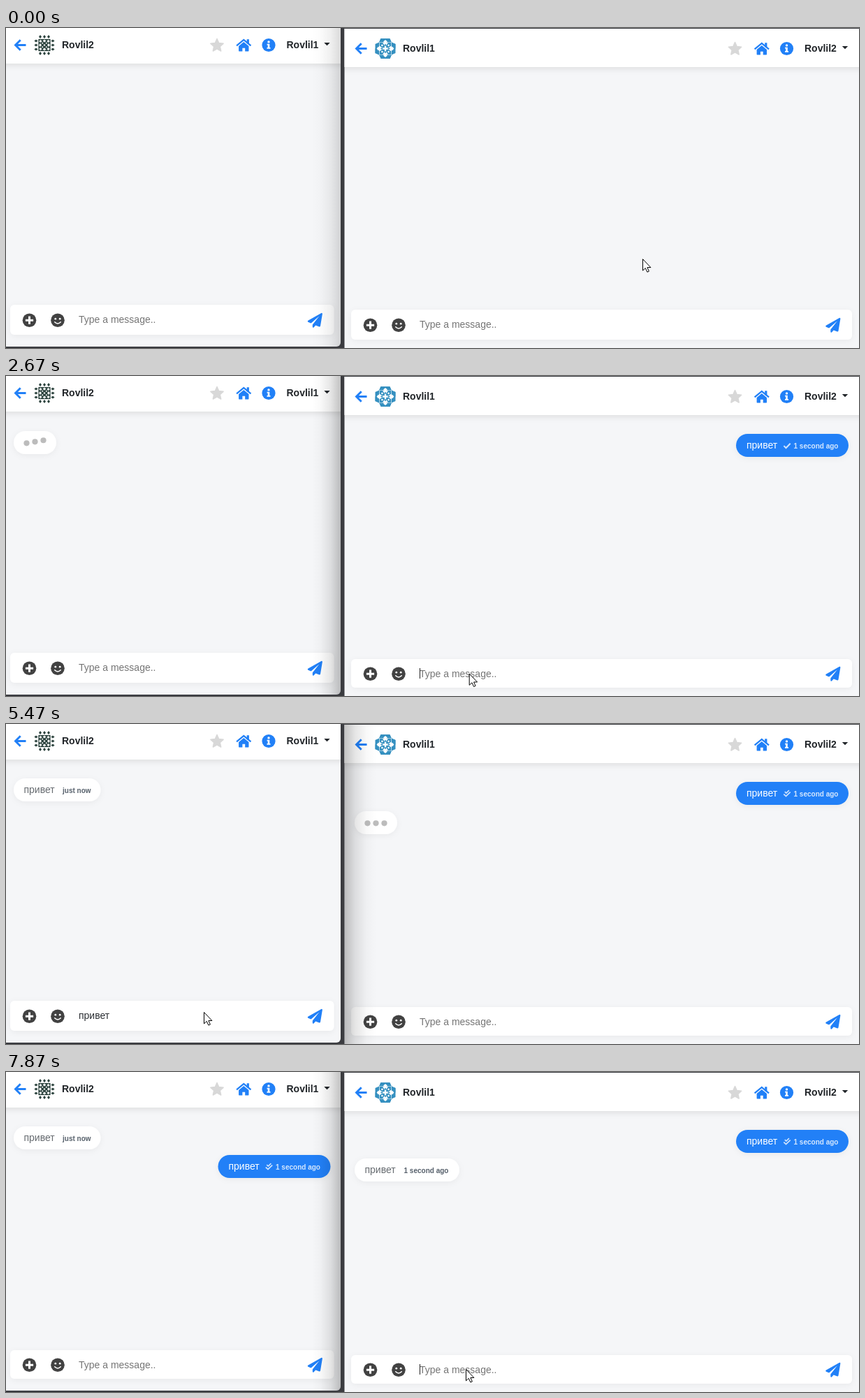
An HTML page that plays this animation: 1221x459 px, repeating every 8000 ms.

```html
<!DOCTYPE html>
<html lang="en">
<head>
<meta charset="utf-8">
<title>Two chat windows</title>
<style>
html, body { margin: 0; width: 100%; height: 100%; overflow: hidden; background: #3b3c40; }
svg { display: block; width: 100vw; height: 100vh; font: 14px "Liberation Sans", Arial, sans-serif; }
.bold { font-weight: 700; fill: #212529; }
.time { font-weight: 700; font-size: 10px; }
</style>
</head>
<body>
<svg id="stage" viewBox="0 0 1221 459" xmlns="http://www.w3.org/2000/svg"></svg>
<script>
const LOOP = 8000, BLINK = 530;
const BLUE = '#2180f7', DARK = '#424242', BG = '#f5f6f8';
const WORD = 'привет';
const stage = document.getElementById('stage');

const at = (x, y, body, extra = '') => `<g transform="translate(${x} ${y})" ${extra}>${body}</g>`;
const turns = (body) => [0, 90, 180, 270].map(a => `<g transform="rotate(${a})">${body}</g>`).join('');
const diamond = (x, y, rx, ry, fill) =>
  `<path d="M${x - rx} ${y}L${x} ${y - ry}L${x + rx} ${y}L${x} ${y + ry}Z" fill="${fill}"/>`;

// Icons are centred on 0,0
const arrow = `<path d="M.2-7.2L-7 0L.2 7.2M-6 0H8" fill="none" stroke="${BLUE}" stroke-width="2.9"/>`;
const home = `<g fill="${BLUE}"><path d="M4.4-8.3H7.6V-2H4.4Z"/>
  <path d="M0-4.6L7.2 1.5V8.3Q7.2 9 6.5 9H1.9V4.2H-1.9V9H-6.5Q-7.2 9-7.2 8.3V1.5Z"/>
  <path d="M-10.2.8L0-7.6L10.2.8" fill="none" stroke="${BLUE}" stroke-width="2.3"/></g>`;
const info = `<circle r="9.6" fill="${BLUE}"/><circle cy="-4.6" r="1.7" fill="#fff"/>
  <path d="M-2.4-1.8H1.3V3.4H2.5V5.3H-2.5V3.4H-1.3V0H-2.4Z" fill="#fff"/>`;
const plus = `<circle r="9.8" fill="${DARK}"/><path d="M-5.6 0H5.6M0-5.6V5.6" stroke="#fff" stroke-width="3"/>`;
const smile = `<circle r="9.8" fill="${DARK}"/><g fill="#fff"><circle cx="-3.2" cy="-2" r="1.4"/>
  <circle cx="3.2" cy="-2" r="1.4"/></g>
  <path d="M-4.3 2.6Q0 7 4.3 2.6" fill="none" stroke="#fff" stroke-width="1.5" stroke-linecap="round"/>`;
const plane = `<path d="M9.2-10.2L-9.8.6Q-11 1.6-9.6 2.6L-5.4 4.3L6.4-6L-3.2 6.4V9.6Q-3 11-1.5 10.3
  L1.2 7.2L6.4 9.3Q7.6 9.6 8 8.4L10.9-9.2Q10.7-10.8 9.2-10.2Z" fill="${BLUE}"/>`;
const star = (() => {
  let pts = '';
  for (let i = 0; i < 10; i++) {
    const r = i % 2 ? 4.5 : 9.6, a = i * Math.PI / 5;
    pts += `${(r * Math.sin(a)).toFixed(2)},${(-r * Math.cos(a)).toFixed(2)} `;
  }
  return `<polygon points="${pts}" fill="#d8d8d8" stroke="#d8d8d8" stroke-width="1.6" stroke-linejoin="round"/>`;
})();

const GREEN = '#2c433e', TEAL = '#3590c0';
const greenFace = `<circle r="15" fill="#fff"/><rect x="-8.6" y="-8.6" width="17.2" height="17.2" fill="${GREEN}"/>` +
  turns([-6, 0, 6].map(x => diamond(x, -12, 2, 2.6, GREEN)).join('') +
    diamond(-5.6, -5.6, 2.2, 2.2, '#fff') + diamond(0, -6, 2.4, 2, '#fff') +
    diamond(-2.8, -2.8, 1.3, 1.3, '#fff')) + diamond(0, 0, 1.5, 1.5, '#fff');
const tealFace = `<circle r="15" fill="#fff"/>` +
  turns(`<path d="M-6.5-14.5H6.5L9-9L14.5-6.5V0H0V-10L-9-9Z" fill="${TEAL}"/>`) +
  `<rect x="-9" y="-9" width="18" height="18" fill="#fff"/>` +
  turns(diamond(0, -10, 3, 2.4, '#fff') + diamond(-11.3, -11.3, 3.2, 3.2, '#fff') +
    `<path d="M-8.4-8.4H-4L-1.2-4.6V-1.2H-4.6L-8.4-4Z" fill="${TEAL}"/>` +
    diamond(-4.6, -4.6, 1.6, 1.6, '#fff') + diamond(0, -5, 1.3, 2, TEAL));

const tick = `<path d="M.9 5.6L4 8.7L10.2 2.2" stroke-width="2"/>`;
const ticks = `<path d="M.8 6.2L4 9.2L10.2 3.2" stroke-width="1.7"/><path d="M2.3 2.6L4.3 4.6L8.4.6" stroke-width="1.5"/>`;

const pill = (w, fill) => `<rect width="${w}" height="33" rx="16.5" fill="${fill}" filter="url(#soft)"/>`;

const received = (id, x, y) => at(x, y, `
  <g id="${id}Old">${pill(150, '#fff')}<text class="time" x="70.5" y="21" fill="#56606b">1 second ago</text></g>
  <g id="${id}New">${pill(124.5, '#fff')}<text class="time" x="70" y="21" fill="#56606b">just now</text></g>
  <text x="14.5" y="21" fill="#666b70">${WORD}</text>`, `id="${id}Got"`);

const sent = (id, x, y) => at(x, y, pill(161, BLUE) + `
  <text x="15" y="21" fill="#fff">${WORD}</text>
  <g fill="none" stroke="#cfe3fd">${at(67.5, 11.5, tick, `id="${id}One"`)}${at(67.5, 11.5, ticks, `id="${id}Two"`)}</g>
  <text class="time" x="82.5" y="21" fill="#d3e6fe">1 second ago</text>`, `id="${id}Sent"`);

const dots = (id, x, y) => at(x, y, pill(61, '#fff') +
  [0, 1, 2].map(i => `<circle id="${id}Dot${i}" cx="${18.5 + 12 * i}" r="4.1" fill="#bcbcbc"/>`).join(''), `id="${id}Dots"`);

// dx shifts left-aligned parts, dr right-aligned ones; hy and iy shift header and input bar
function chat({ id, dx, dr, hy, iy, face, peer, me }) {
  const right = dr + 480;
  return `
  <rect x="${dx - 4}" width="${right - dx + 4}" height="459" fill="${BG}"/>
  <rect x="${dx - 20}" y="-20" width="${right - dx + 40}" height="${71 + hy}" fill="#fff" filter="url(#bar)"/>
  ${at(dx, hy, at(20.5, 24.5, arrow) + at(55, 24.5, face) + `<text class="bold" x="80" y="28.5">${peer}</text>`)}
  ${at(dr, hy, at(302, 25.2, star) + at(340.3, 24.5, home) + at(376, 24.5, info) +
    `<text class="bold" x="401.5" y="28.5">${me}</text><path d="M455.3 21H463.7L459.5 25.3Z" fill="#212529"/>`)}
  <rect id="${id}Bar" x="${dx + 6}" width="${dr - dx + 463.5}" rx="6" fill="#fff" filter="url(#soft)"/>
  <g id="${id}Icons">${at(dx + 33.5, 0, plus) + at(dx + 74, 0, smile) + at(dr + 442, 0, plane)}</g>
  <text id="${id}Hint" x="${dx + 104}" fill="#757575">Type a message..</text>
  <text id="${id}Typed" x="${dx + 104}" fill="#2b2f33"></text>
  <rect id="${id}Caret" width="1" height="15" fill="#222"/>`;
}

const fade = (id, x1, x2) => `<linearGradient id="${id}" x1="${x1}" x2="${x2}">
  <stop offset="0" stop-color="#000" stop-opacity=".24"/><stop offset=".35" stop-color="#000" stop-opacity=".1"/>
  <stop offset=".7" stop-color="#000" stop-opacity=".025"/><stop offset="1" stop-color="#000" stop-opacity="0"/></linearGradient>`;

const L = { id: 'l', dx: 0, dr: 0, hy: 0, iy: 0, face: greenFace, peer: 'Rovlil2', me: 'Rovlil1',
  keys: [4270, 4330, 4400, 4600, 4730, 4870], send: 5730, focus: [[3400, 6800]],
  typing: [2300, 3270], wave: 2390, got: 3270, fresh: 4930, read: 7330 };
const R = { id: 'r', dx: 488, dr: 741.5, hy: 5, iy: 7, face: tealFace, peer: 'Rovlil1', me: 'Rovlil2',
  keys: [1600, 1670, 1730, 1800, 1930, 2070], send: 2270, focus: [[730, 3400], [6800, LOOP]],
  typing: [4940, 7070], wave: 5060, got: 7070, fresh: LOOP, read: 4000 };

stage.innerHTML = `
<defs>
  <filter id="soft" x="-20%" y="-50%" width="140%" height="200%"><feDropShadow dx="0" dy="2" stdDeviation="4" flood-opacity=".05"/></filter>
  <filter id="bar" x="-5%" y="-20%" width="110%" height="160%"><feDropShadow dx="0" dy="2" stdDeviation="5" flood-opacity=".11"/></filter>
  <clipPath id="lClip"><rect x="-10" y="-10" width="489" height="467" rx="6"/></clipPath>
  <clipPath id="rClip"><rect x="484.5" y="1" width="737" height="458"/></clipPath>
  ${fade('toLeft', 1, 0)}${fade('toRight', 0, 1)}
</defs>
<rect width="1221" height="459" fill="#3b3c40"/>
<g clip-path="url(#lClip)">${chat(L)}${received('l', 11, 78)}${dots('l', 11, 79)}${sent('l', 303.5, 119)}
  <rect id="lShade" x="438" width="41" height="459" fill="url(#toLeft)"/></g>
<g clip-path="url(#rClip)">${chat(R)}${sent('r', 1045, 83)}${received('r', 499, 124)}${dots('r', 499, 125)}
  <rect id="rShade" x="484" width="46" height="459" fill="url(#toRight)"/></g>
<g id="mouse" stroke="#000" fill="#fff">
  <path id="pointer" d="M0 0V16.4L3.8 12.9L6.4 18.6L8.9 17.5L6.4 12H11.4Z"/>
  <path id="resize" d="M-10 0L-5-5V-1.5H5V-5L10 0L5 5V1.5H-5V5Z"/>
</g>`;

const el = {};
stage.querySelectorAll('[id]').forEach(n => el[n.id] = n);
const show = (id, on) => el[id].setAttribute('visibility', on ? 'inherit' : 'hidden');
const set = (id, attrs) => { for (const k in attrs) el[id].setAttribute(k, attrs[k]); };
const within = (t, [a, b]) => t >= a && t < b;

// time, x, y of the pointer
const path = [[0, 911.5, 331.5], [70, 911.5, 331.5], [730, 712.5, 428], [869, 712.5, 428], [870, 712.5, 427.5],
  [2500, 712.5, 427.5], [3130, 440, 425], [3330, 265.5, 417.5], [3530, 281.5, 414.5], [4600, 281.5, 414.5],
  [4800, 283.5, 413.5], [6000, 283.5, 413.5], [6270, 490, 459], [6730, 658.5, 426.5], [LOOP, 658.5, 426.5]];

function pointerAt(t) {
  const i = Math.max(1, path.findIndex(p => p[0] > t));
  const [t0, x0, y0] = path[i - 1], [t1, x1, y1] = path[i];
  const u = (t - t0) / (t1 - t0), e = u * u * (3 - 2 * u);
  return [x0 + (x1 - x0) * e, y0 + (y1 - y0) * e];
}

// One bounce: up and down in 280 ms, each dot 65 ms after the one before
function lift(t, wave, i) {
  if (t < wave || t > 6900) return 0;
  const p = (t - wave) % 940 - 65 * i;
  return 4.4 * Math.max(0, 1 - Math.abs(p - 140) / 140);
}

function drawChat(w, t) {
  const { id, dx, iy } = w;
  const done = t >= w.send, drop = done ? 2 : 0;
  const typed = done ? '' : WORD.slice(0, w.keys.filter(k => t >= k).length);
  set(id + 'Bar', { y: 397 + iy + drop, height: 43 - drop });
  set(id + 'Icons', { transform: `translate(0 ${419.2 + iy + drop / 2})` });
  set(id + 'Hint', { y: 422.5 + iy + drop });
  set(id + 'Typed', { y: 422.5 + iy + drop });
  el[id + 'Typed'].textContent = typed;
  show(id + 'Hint', !typed);

  const span = w.focus.find(f => within(t, f));
  const last = span && Math.max(...[span[0], ...w.keys, w.send].filter(k => k <= t));
  show(id + 'Caret', span && (t - last) % (2 * BLINK) < BLINK);
  const end = typed ? el[id + 'Typed'].getComputedTextLength() : 0;
  set(id + 'Caret', { x: Math.floor(dx + 104 + end), y: 410 + iy + drop });

  show(id + 'Sent', done);
  show(id + 'One', done && t < w.read);
  show(id + 'Two', done && t >= w.read);
  const got = t >= w.got;
  show(id + 'Got', got);
  show(id + 'Old', got && t < w.fresh);
  show(id + 'New', got && t >= w.fresh);
  show(id + 'Dots', within(t, w.typing));
  for (let i = 0; i < 3; i++) set(`${id}Dot${i}`, { cy: 17.3 - lift(t, w.wave, i) });
}

function draw(t) {
  drawChat(L, t);
  drawChat(R, t);
  const leftActive = within(t, L.focus[0]);
  set('lShade', { opacity: leftActive ? 0 : t < 70 ? 0.6 : 1 });
  set('rShade', { opacity: leftActive ? 1 : 0 });
  const [x, y] = pointerAt(t), edge = within(t, [6230, 6320]);
  set('mouse', { transform: `translate(${x.toFixed(1)} ${y.toFixed(1)})` });
  show('pointer', !edge);
  show('resize', edge);
}

const start = performance.now();
function tickFrame() {
  draw((performance.now() - start) % LOOP);
  requestAnimationFrame(tickFrame);
}
tickFrame();
</script>
</body>
</html>
```
